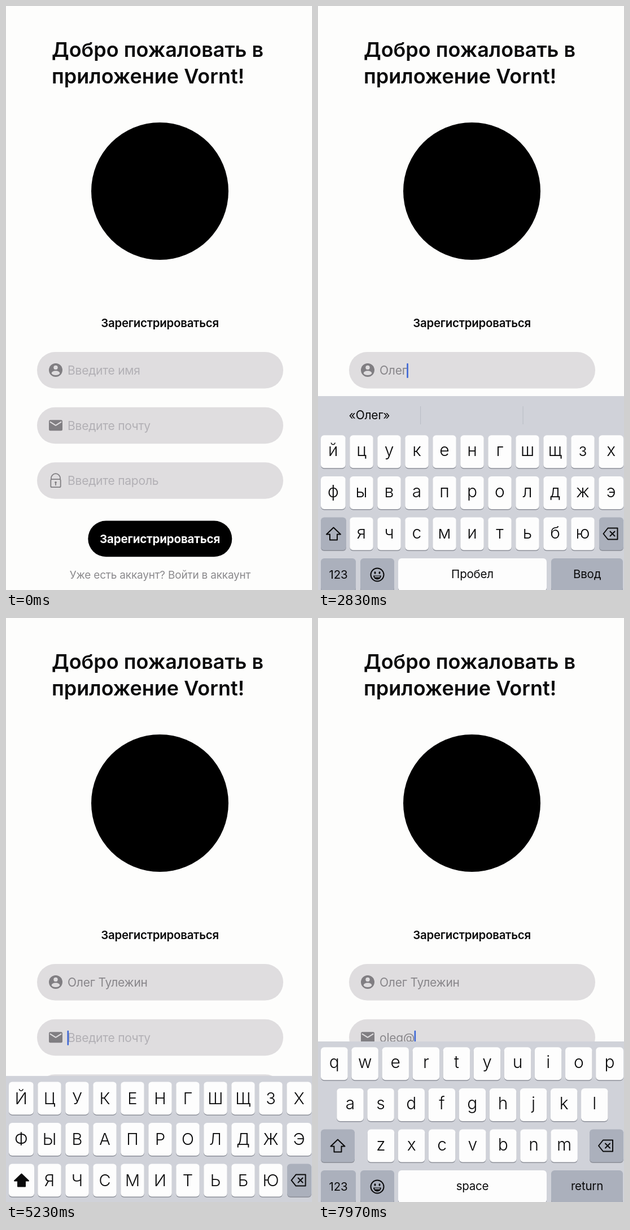
An HTML page with a canvas that plays this animation: 542x1033 px, repeating every 8000 ms.

```html
<!DOCTYPE html>
<html lang="ru">
<head>
<meta charset="utf-8">
<title>Регистрация</title>
<style>
html, body { margin: 0; width: 100%; height: 100%; overflow: hidden; background: #fdfdfc; }
canvas { display: block; width: 542px; height: 1033px; }
</style>
</head>
<body>
<canvas id="stage"></canvas>
<script>
const W = 542, H = 1033, LOOP = 8000;
const canvas = document.getElementById('stage');
const ctx = canvas.getContext('2d');
const dpr = window.devicePixelRatio || 1;
canvas.width = W * dpr;
canvas.height = H * dpr;

const FIRST = 'Олег', LAST = 'Тулежин', MAIL = 'oleg@';
const INK = '#0a0a0b', ICON = '#807e82', FIELD = '#dfdddf';
const PALE = '#b2b0b5', TYPED = '#88868a', CARET = '#3c66d6';
const KEY = '#fdfdfd', DARK_KEY = '#abb0bc', BOARD = '#d0d2d9';

// Moments of the scene, in ms
const T = {
  nameFocus: 1859, first: 2340, space: 3000, shift: 3150, last: 3350,
  nameBlur: 4640, mailFocus: 5067, latin: 5880, lower: 6640, mail: 6800, at: 7650
};

const LAYOUTS = {
  ru: { rows: ['йцукенгшщзх', 'фывапролджэ', 'ячсмитьбю'], x: [28, 28, 77], pitch: 49, w: 41.5,
        shift: 45, del: 43, space: 'Пробел', enter: 'Ввод' },
  en: { rows: ['qwertyuiop', 'asdfghjkl', 'zxcvbnm'], x: [29, 57, 111.5], pitch: 54.1, w: 47.5,
        shift: 60, del: 60, space: 'space', enter: 'return' }
};

function text(s, x, y, size, { weight = 400, color = INK, align = 'left', spacing = 0 } = {}) {
  ctx.font = `${weight} ${size}px Inter, Roboto, sans-serif`;
  ctx.letterSpacing = spacing + 'px';
  ctx.textAlign = align;
  ctx.fillStyle = color;
  ctx.fillText(s, x, y);
}

function box(x, y, w, h, r, color) {
  ctx.fillStyle = color;
  ctx.beginPath();
  ctx.roundRect(x, y, w, h, r);
  ctx.fill();
}

function disc(x, y, r, color) {
  ctx.fillStyle = color;
  ctx.beginPath();
  ctx.arc(x, y, r, 0, Math.PI * 2);
  ctx.fill();
}

function line(points, close) {
  ctx.beginPath();
  points.forEach(([x, y]) => ctx.lineTo(x, y));
  if (close) ctx.closePath();
}

function pen(color, width) {
  ctx.strokeStyle = color;
  ctx.lineWidth = width;
  ctx.lineJoin = ctx.lineCap = 'round';
}

// Cubic Bezier easing (0.38, 0.7, 0.125, 1)
function ease(p) {
  if (p <= 0) return 0;
  if (p >= 1) return 1;
  const at = (s, a, b) => 3 * s * (1 - s) ** 2 * a + 3 * s * s * (1 - s) * b + s ** 3;
  let lo = 0, hi = 1;
  for (let i = 0; i < 20; i++) {
    const mid = (lo + hi) / 2;
    if (at(mid, 0.38, 0.125) < p) lo = mid; else hi = mid;
  }
  return at(lo, 0.7, 1);
}

const slide = (t, start) => ease((t - start) / 500);

function typed(word, t, start, step) {
  return t < start ? '' : word.slice(0, Math.floor((t - start) / step) + 1);
}

function personIcon(x, y) {
  disc(x, y, 12, ICON);
  disc(x, y - 4.6, 3.7, FIELD);
  ctx.fillStyle = FIELD;
  ctx.beginPath();
  ctx.ellipse(x, y + 5.2, 7.2, 3.9, 0, 0, Math.PI * 2);
  ctx.fill();
}

function mailIcon(x, y) {
  box(x - 12, y - 9.5, 24, 19, 2.5, ICON);
  pen(FIELD, 2);
  line([[x - 9.5, y - 6], [x, y], [x + 9.5, y - 6]]);
  ctx.stroke();
}

function lockIcon(x, y) {
  pen(ICON, 1.8);
  ctx.beginPath();
  ctx.roundRect(x - 8.7, y - 2, 17.4, 14, 2);
  ctx.moveTo(x - 8, y - 2);
  ctx.lineTo(x - 8, y - 4);
  ctx.arc(x, y - 4, 8, Math.PI, 0);
  ctx.lineTo(x + 8, y - 2);
  ctx.stroke();
  disc(x, y + 3.5, 1.8, ICON);
  box(x - 0.9, y + 3.5, 1.8, 5.5, 0.9, ICON);
}

function field(y, icon, hint, value, focusedFor) {
  box(55, y, 436, 64.5, 32, FIELD);
  icon(88, y + 32);
  text(value || hint, 109, y + 40, 21, { color: value ? TYPED : PALE, spacing: -0.2 });
  if (focusedFor >= 0 && focusedFor % 1000 < 560) {
    const w = value ? ctx.measureText(value).width : 0;
    box(108.5 + w, y + 20, 2.6, 26, 1, CARET);
  }
}

function key(x, y, w, color) {
  box(x, y + 1.5, w, 58, 6, '#8d9099');
  box(x, y, w, 58, 6, color);
}

function shiftKey(w, upper) {
  const x = 5 + w / 2, y = 933.5;
  key(5, 904.5, w, upper ? KEY : DARK_KEY);
  line([[x, y - 11], [x + 12.5, y + 1], [x + 6.5, y + 1], [x + 6.5, y + 11],
        [x - 6.5, y + 11], [x - 6.5, y + 1], [x - 12.5, y + 1]], true);
  pen(INK, 2);
  ctx.stroke();
  if (upper) {
    ctx.fillStyle = INK;
    ctx.fill();
  }
}

function deleteKey(w) {
  const x = 540 - w / 2, y = 933.5;
  key(541 - w, 904.5, w, DARK_KEY);
  pen(INK, 2);
  line([[x - 13, y], [x - 5, y - 10], [x + 12, y - 10], [x + 12, y + 10], [x - 5, y + 10]], true);
  ctx.stroke();
  line([[x - 1, y - 4], [x + 7, y + 4]]);
  ctx.stroke();
  line([[x + 7, y - 4], [x - 1, y + 4]]);
  ctx.stroke();
}

function smile(x, y) {
  pen(INK, 2);
  ctx.beginPath();
  ctx.arc(x, y, 11.5, 0, Math.PI * 2);
  ctx.stroke();
  for (const side of [-4, 4]) {
    ctx.fillStyle = INK;
    ctx.beginPath();
    ctx.ellipse(x + side, y - 3.5, 1.5, 2.2, 0, 0, Math.PI * 2);
    ctx.fill();
  }
  ctx.beginPath();
  ctx.arc(x, y + 1.5, 7, 0, Math.PI);
  ctx.closePath();
  ctx.fill();
  box(x - 4.8, y + 2.6, 9.6, 1.9, 0.9, DARK_KEY);
}

function keyboard(lang, upper, shown, words, spaceLabel) {
  const kb = LAYOUTS[lang];
  const top = words ? 690 : 749;
  ctx.save();
  ctx.translate(0, (H - top) * (1 - shown));
  ctx.fillStyle = BOARD;
  ctx.fillRect(0, top, W, H - top);

  if (words) {
    words.forEach((word, i) => text(word, 91 + i * 181.5, 731, 21, { align: 'center', spacing: -0.2 }));
    ctx.fillStyle = '#bcbfc7';
    ctx.fillRect(181, 708, 1.2, 32);
    ctx.fillRect(362.5, 708, 1.2, 32);
  }

  kb.rows.forEach((row, r) => {
    const y = 759.3 + r * 72.6;
    [...row].forEach((ch, i) => {
      const cx = kb.x[r] + i * kb.pitch;
      let left = cx - kb.w / 2, right = cx + kb.w / 2;
      if (left < 10) left = 5;
      if (right > 535) right = 541;
      key(left, y, right - left, KEY);
      text(upper ? ch.toUpperCase() : ch, (left + right) / 2, y + (upper ? 39.5 : 37), upper ? 29 : 30,
           { weight: upper ? 350 : 300, align: 'center' });
    });
  });

  shiftKey(kb.shift, upper);
  deleteKey(kb.del);
  key(5, 977, 62, DARK_KEY);
  key(75, 977, 60, DARK_KEY);
  key(142, 977, 263, KEY);
  key(413, 977, 127, DARK_KEY);
  const label = { align: 'center', spacing: -0.2 };
  text('123', 36, 1013, 20.5, label);
  smile(105, 1006);
  text(spaceLabel || kb.space, 273.5, 1012, 20.5, label);
  text(kb.enter, 476.5, 1012, 20.5, label);
  ctx.restore();
}

function nameKeyboard(t, first, last) {
  const upper = t < T.first || (t >= T.shift && t < T.last);
  const word = t < T.space ? first : last;
  const words = t < T.first ? ['Я', 'Ну', 'Как'] : [word && `«${word}»`, '', ''];
  keyboard('ru', upper, slide(t, T.nameFocus) - slide(t, T.nameBlur), words);
}

function mailKeyboard(t) {
  const latin = t >= T.latin;
  keyboard(latin ? 'en' : 'ru', t < T.lower, slide(t, T.mailFocus), null,
           latin && t < T.lower ? 'English (US)' : '');
}

// Caret time restarts at every keystroke
function caretAge(t, start, end, strokes) {
  if (t < start || t >= end) return -1;
  return t - Math.max(start, ...strokes.filter(s => s <= t));
}

const strokes = (word, start, step) => [...word].map((_, i) => start + i * step);
const nameStrokes = [...strokes(FIRST, T.first, 130), T.space, ...strokes(LAST, T.last, 145)];
const mailStrokes = [...strokes(MAIL.slice(0, 4), T.mail, 150), T.at];

function draw(t) {
  ctx.setTransform(dpr, 0, 0, dpr, 0, 0);
  ctx.fillStyle = '#fdfdfc';
  ctx.fillRect(0, 0, W, H);

  const title = { weight: 600 };
  text('Добро пожаловать в', 81, 90, 36, title);
  text('приложение Vornt!', 81, 137, 36, title);
  disc(272.5, 327.5, 121.5, '#000');
  text('Зарегистрироваться', 272.5, 567.5, 20.5, { weight: 600, align: 'center', spacing: -0.3 });

  const first = typed(FIRST, t, T.first, 130);
  const last = typed(LAST, t, T.last, 145);
  const name = first + (t >= T.space ? ' ' : '') + last;
  const mail = t < T.at ? typed(MAIL.slice(0, 4), t, T.mail, 150) : MAIL;

  field(612, personIcon, 'Введите имя', name, caretAge(t, T.nameFocus, T.nameBlur, nameStrokes));
  field(709.8, mailIcon, 'Введите почту', mail, caretAge(t, T.mailFocus, LOOP, mailStrokes));
  field(807.2, lockIcon, 'Введите пароль', '', -1);

  box(145.3, 910.5, 255, 63.7, 31.8, '#000');
  text('Зарегистрироваться', 272.5, 950, 20.5, { weight: 700, color: '#fff', align: 'center', spacing: -0.2 });
  text('Уже есть аккаунт? Войти в аккаунт', 273, 1012.5, 19, { color: '#8b8a8d', align: 'center', spacing: -0.2 });

  if (t >= T.mailFocus) mailKeyboard(t);
  else if (t >= T.nameFocus) nameKeyboard(t, first, last);
}

const begin = performance.now();
function tick() {
  draw((performance.now() - begin) % LOOP);
  requestAnimationFrame(tick);
}
tick();
</script>
</body>
</html>
```
